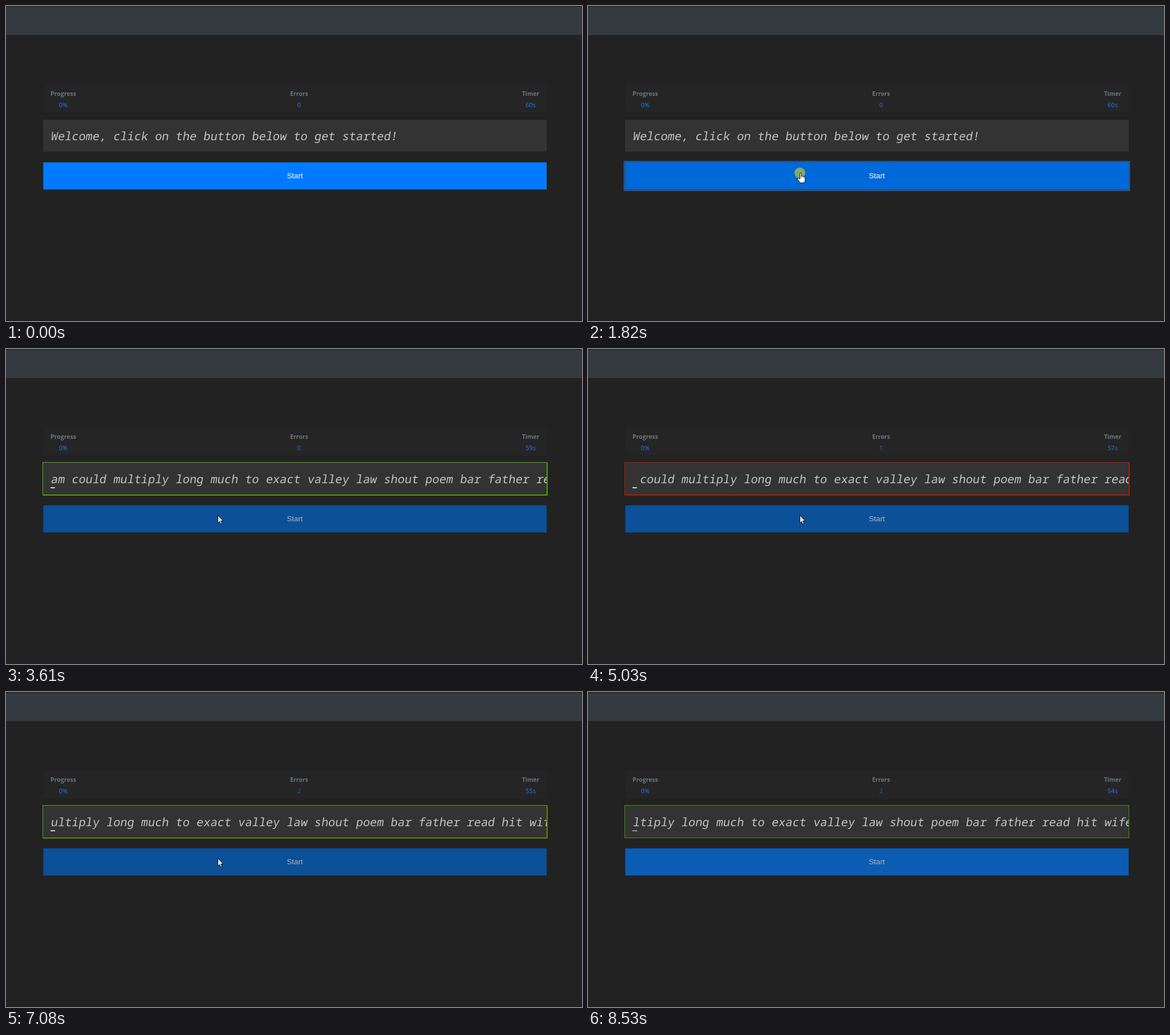
An HTML page that plays this animation: 1010x554 px, repeating every 8600 ms.

```html
<!DOCTYPE html>
<html lang="en">
<head>
<meta charset="utf-8">
<title>Typing test</title>
<style>
  html, body { margin: 0; width: 100%; height: 100%; overflow: hidden; background: #222; }
  #stage { position: relative; width: 1010px; height: 554px; overflow: hidden; background: #222; }
  #stage div, #stage svg { position: absolute; box-sizing: border-box; }
  .edge { left: 0; width: 1010px; height: 2px; }
  .nav { left: 0; top: 2px; width: 1010px; height: 49px; background: #343a40; }
  .stats { left: 65px; top: 138px; width: 883px; height: 49px; background: #252525; border-radius: 3px; }
  .stat { top: 0; width: 80px; text-align: center; font: 11px/16px "Open Sans", sans-serif; color: #1a7bff; }
  .stat b { display: block; margin: 8px 0 4px; font-size: 10.5px; color: #6c757d; }
  .stat span { display: block; }
  .panel { left: 65px; top: 200px; width: 883px; height: 56px; background: #333; overflow: hidden; }
  #words { left: 12.5px; top: 0; white-space: pre; color: #c3c3c3;
    font: 20.28px/56px "Noto Sans Mono", monospace;
    transform: skewX(-9deg); transform-origin: 0 36px; }
  #caret { left: 78px; top: 243px; width: 8px; height: 2px; background: #d2d2d2; }
  #frame { left: 65px; top: 200px; width: 883px; height: 56px; }
  #button { left: 65px; top: 275px; width: 883px; height: 48px; color: #fff; text-align: center;
    font: 13.33px/47px "Liberation Sans", Arial, sans-serif; }
  #ripple { left: 361.5px; top: 283.5px; width: 19px; height: 19px; border-radius: 50%; background: rgba(255, 235, 0, .5); }
  #arrow, #hand { left: 0; top: 0; overflow: visible; }
</style>
</head>
<body>
<div id="stage">
  <div class="edge" style="top:0;background:#2b2b2e"></div>
  <div class="nav"></div>
  <div class="stats">
    <div class="stat" style="left:-4.5px"><b>Progress</b><span>0%</span></div>
    <div class="stat" style="left:409px"><b>Errors</b><span id="errors">0</span></div>
    <div class="stat" style="left:815px"><b>Timer</b><span id="timer">60s</span></div>
  </div>
  <div class="panel"><div id="words"></div></div>
  <div id="caret"></div>
  <div id="frame"></div>
  <div id="button">Start</div>
  <div id="ripple"></div>
  <svg id="arrow" width="14" height="20">
    <path d="M-.5 -.5V13.2L2.5 10.4L4.6 15L6.8 14L4.8 9.5H9Z" fill="#e6e6e6" stroke="#111"/>
  </svg>
  <svg id="hand" width="16" height="20">
    <path d="M-.3 1.2Q1-.6 2.2 1.2V6Q3.7 5 4.7 6.5Q6 5.8 7 7.2Q8.6 6.8 8.8 8.5V12.5Q8.6 15 7.5 18H-.5Q-1.6 15-4.8 11.2Q-5 8.9-2.4 9.8L-.3 11.4Z" fill="#fff" stroke="#111"/>
    <path d="M2.2 6V9M4.7 6.8V9M7 7.4V9.5" stroke="#333" stroke-width=".8"/>
  </svg>
  <div class="edge" style="top:552px;background:#1e1e1e"></div>
</div>
<script>
const LOOP = 8600;
const WELCOME = "Welcome, click on the button below to get started!";
const WORDS = "I am could multiply long much to exact valley law shout poem bar father read hit wife";
const START = 1900, SECOND_TICKS = [2960, 3950, 4950, 5970, 6960, 7950];
const KEYS = [2760, 3200, 3850, 4150, 5110, 5240, 5400, 5540, 6060, 6400, 6620, 6880, 8150];
const ERRORS = [4480, 7080], FIXES = [5110, 8150];
const ENTER = 430, LEAVE = 8370, BLUR = 8460;
const GREEN = [76, 187, 0], RED = [204, 24, 0];
const BLUE = [0, 123, 255], HOVER = [0, 105, 217];

const $ = id => document.getElementById(id);
const ramp = (t, from, to) => Math.min(1, Math.max(0, (t - from) / (to - from)));
const mix = (a, b, k) => a.map((v, i) => v + (b[i] - v) * k);
const rgba = (c, alpha = 1) => `rgba(${c.map(Math.round).join()},${alpha})`;
const passed = (times, t) => times.filter(at => at <= t).length;
const show = (id, on) => { $(id).style.visibility = on ? "visible" : "hidden"; };

function caretOpacity(t) {
  const HALF = 250.5, since = t - 2190;
  if (since < 0) return 1;
  if (since % HALF < 80) return .6;
  return Math.floor(since / HALF) % 2;
}

function pointer(t) {
  if (t < 4000) {
    const k = 1 - (1 - ramp(t, 90, 590)) ** 2;
    return [425 - 53 * k, 530 - 237 * k];
  }
  const k = ramp(t, 8250, 8500) ** 1.5;
  return [372 + 20 * k, 293 + 187 * k];
}

function drawField(t) {
  const started = t >= START;
  $("words").textContent = started ? WORDS.slice(passed(KEYS, t)) : WELCOME;
  show("caret", started);
  $("caret").style.opacity = caretOpacity(t);
  show("frame", started);
  let red = 0;
  ERRORS.forEach((at, i) => {
    red += ramp(t, at - 45, at + 220) - ramp(t, FIXES[i], FIXES[i] + 240);
  });
  // The ring is a fraction over one pixel wide; the rest falls right and below.
  const color = mix(GREEN, RED, red);
  const excess = t < BLUR ? .6 : 0;
  $("frame").style.boxShadow = `0 0 0 1px ${rgba(color)}, 1px 1px 0 1px ${rgba(color, excess)}`;
  $("frame").style.opacity = ramp(t, START - 60, 2050) * (t < BLUR ? 1 : .75);
}

function drawButton(t) {
  const hover = ramp(t, ENTER - 60, 590) - ramp(t, LEAVE - 60, LEAVE + 120);
  const ring = t >= 1820 && t < 1980 ? "0 0 0 2.5px rgba(38,143,255,.5), " : "";
  const button = $("button").style;
  button.background = rgba(mix(BLUE, HOVER, hover));
  button.opacity = 1 - .35 * ramp(t, START - 70, 2050);
  button.boxShadow = ring + "inset 1px -1px rgba(34,34,34,.35)";
  show("ripple", t >= 1820 && t < START);
}

function drawPointer(t) {
  const [x, y] = pointer(t);
  const present = t >= 130 && t < 8530;
  const overButton = y < 322 && t < 1980;
  show("arrow", present && !overButton);
  show("hand", present && overButton);
  $("arrow").style.transform = $("hand").style.transform = `translate(${x}px,${y}px)`;
}

function draw() {
  const t = performance.now() % LOOP;
  const errors = passed(ERRORS, t);
  $("errors").textContent = errors;
  $("errors").style.color = ["#1a7bff", "#1b6fd8", "#20619f"][errors];
  $("timer").textContent = 60 - passed(SECOND_TICKS, t) + "s";
  drawField(t);
  drawButton(t);
  drawPointer(t);
  requestAnimationFrame(draw);
}
draw();
</script>
</body>
</html>
```
